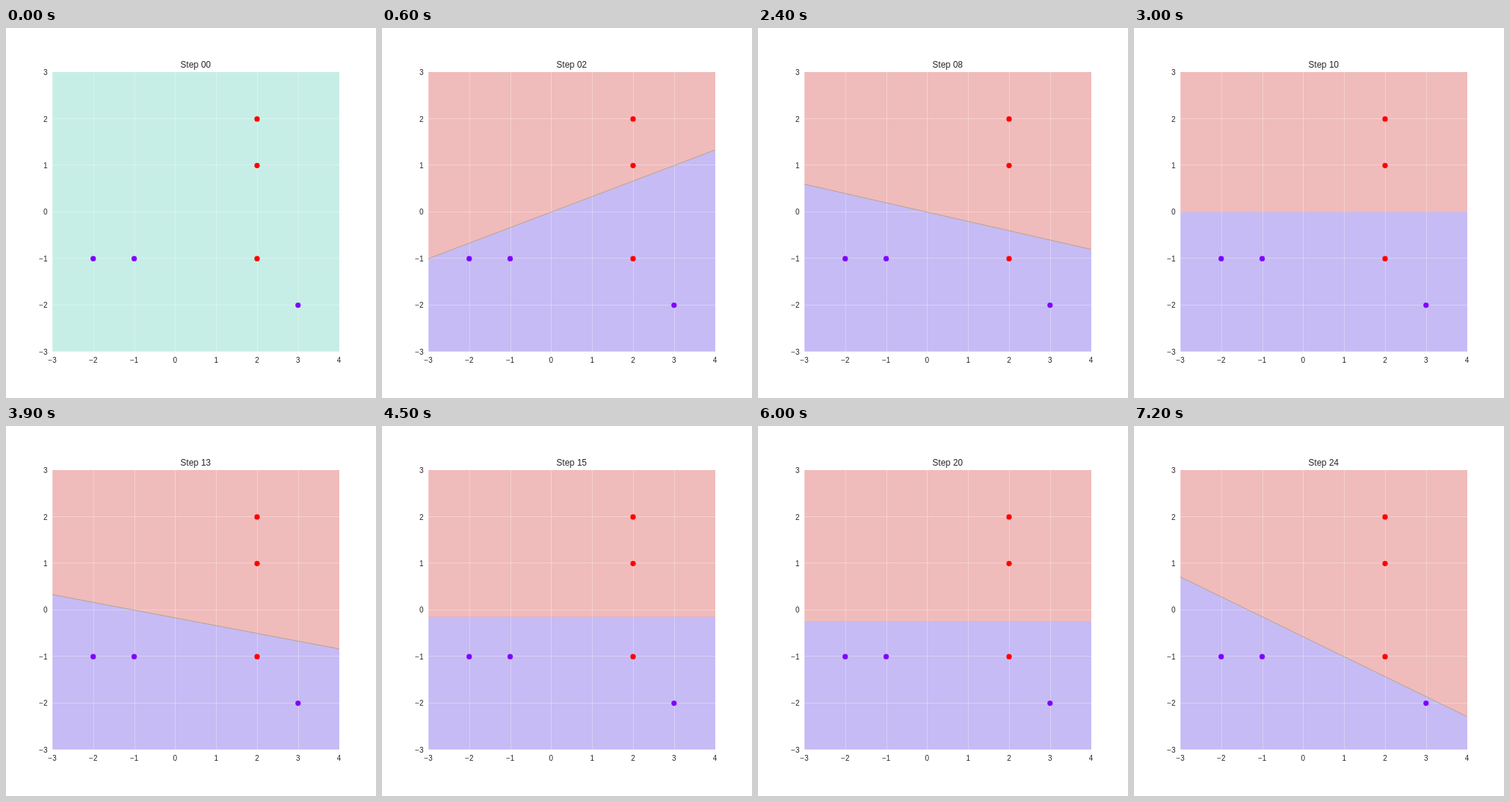
An HTML page that plays this animation: 504x504 px, repeating every 8700 ms.

```html
<!DOCTYPE html>
<html lang="en">
<head>
<meta charset="utf-8">
<title>Perceptron steps</title>
<style>
  html, body { margin: 0; width: 100%; height: 100%; overflow: hidden; background: #fff; }
  svg { display: block; }
  text { font: 10px "Liberation Sans", Arial, sans-serif; fill: #262626; }
  #title { font-size: 12px; text-anchor: middle; }
  .x { text-anchor: middle; }
  .y { text-anchor: end; }
  #grid { stroke: #fff; stroke-opacity: .3; }
</style>
</head>
<body>
<svg width="504" height="504" viewBox="0 0 504 504">
  <clipPath id="axes"><rect x="63" y="60" width="391" height="381"/></clipPath>
  <g clip-path="url(#axes)">
    <rect id="base" x="63" y="60" width="391" height="381"/>
    <polygon id="upper" fill="#f0bbbb"/>
    <g id="grid"></g>
    <line id="edge"/>
  </g>
  <g id="dots"></g>
  <g id="labels"></g>
  <text id="title" x="258.3" y="54"></text>
</svg>
<script>
const STEP_MS = 300, LAST_STEP = 24, LOOP_MS = 8700;
const RED = '#ff0000', PURPLE = '#8000ff';
const get = id => document.getElementById(id);
const px = x => 63 + (x + 3) * 55.8;
const py = y => 60.48 + (3 - y) * 63.42;

function set(el, attrs) {
  for (const key in attrs) el.setAttribute(key, attrs[key]);
  return el;
}
function add(parent, tag, attrs) {
  const el = document.createElementNS('http://www.w3.org/2000/svg', tag);
  return get(parent).appendChild(set(el, attrs));
}

// x, y, class
const samples = [[2, 1, 1], [3, -2, -1], [-2, -1, -1], [2, -1, 1], [2, 2, 1], [-1, -1, -1]];

// Cycle through the samples and record the weights after each correction.
function train() {
  let w = [0, 0, 0];
  const history = [w];
  for (let i = 0; history.length <= LAST_STEP; i++) {
    const [x, y, c] = samples[i % samples.length];
    if (c * (w[0] * x + w[1] * y + w[2]) <= 0) {
      w = [w[0] + c * x, w[1] + c * y, w[2] + c];
      history.push(w);
    }
  }
  return history;
}
const weights = train();

function drawAxes() {
  const label = (n, cls, x, y) => {
    add('labels', 'text', { class: cls, x, y }).textContent = String(n).replace('-', '\u2212');
  };
  for (let n = -3; n <= 4; n++) {
    const x = Math.round(px(n)) + .5;
    add('grid', 'line', { x1: x, x2: x, y1: 60, y2: 441 });
    label(n, 'x', px(n), 456);
    if (n > 3) continue;
    const y = 503.5 - Math.round(504 - py(n));
    add('grid', 'line', { x1: 63, x2: 454, y1: y, y2: y });
    label(n, 'y', 56.5, Math.round(py(n) + 3.6));
  }
  for (const [x, y, c] of samples) {
    add('dots', 'circle', { cx: px(x), cy: py(y), r: 3.65, fill: c > 0 ? RED : PURPLE });
  }
}

function drawStep(step) {
  const [a, b, c] = weights[step];
  get('title').textContent = 'Step ' + String(step).padStart(2, '0');
  set(get('base'), { fill: step ? '#c6bbf5' : '#c6eee6' });
  const display = step ? 'inline' : 'none';
  set(get('upper'), { display });
  set(get('edge'), { display });
  if (!step) return;
  const at = x => py(-(a * x + c) / b);
  const left = at(-3), right = at(4), x2 = px(4);
  const top = Math.min(60, left, right);
  set(get('upper'), { points: `63,${left} 63,${top} 454,${top} 454,${right} ${x2},${right}` });
  set(get('edge'), {
    x1: 63, y1: left, x2, y2: right,
    stroke: a ? '#a89c72' : '#f0a8a8',
    'stroke-opacity': a ? .75 : .5,
    'shape-rendering': a ? 'auto' : 'crispEdges'
  });
}

drawAxes();
const start = performance.now();
let shown = -1;
function tick() {
  const time = (performance.now() - start) % LOOP_MS;
  const step = Math.min(LAST_STEP, Math.floor(time / STEP_MS));
  if (step !== shown) drawStep(shown = step);
  requestAnimationFrame(tick);
}
tick();
</script>
</body>
</html>
```
